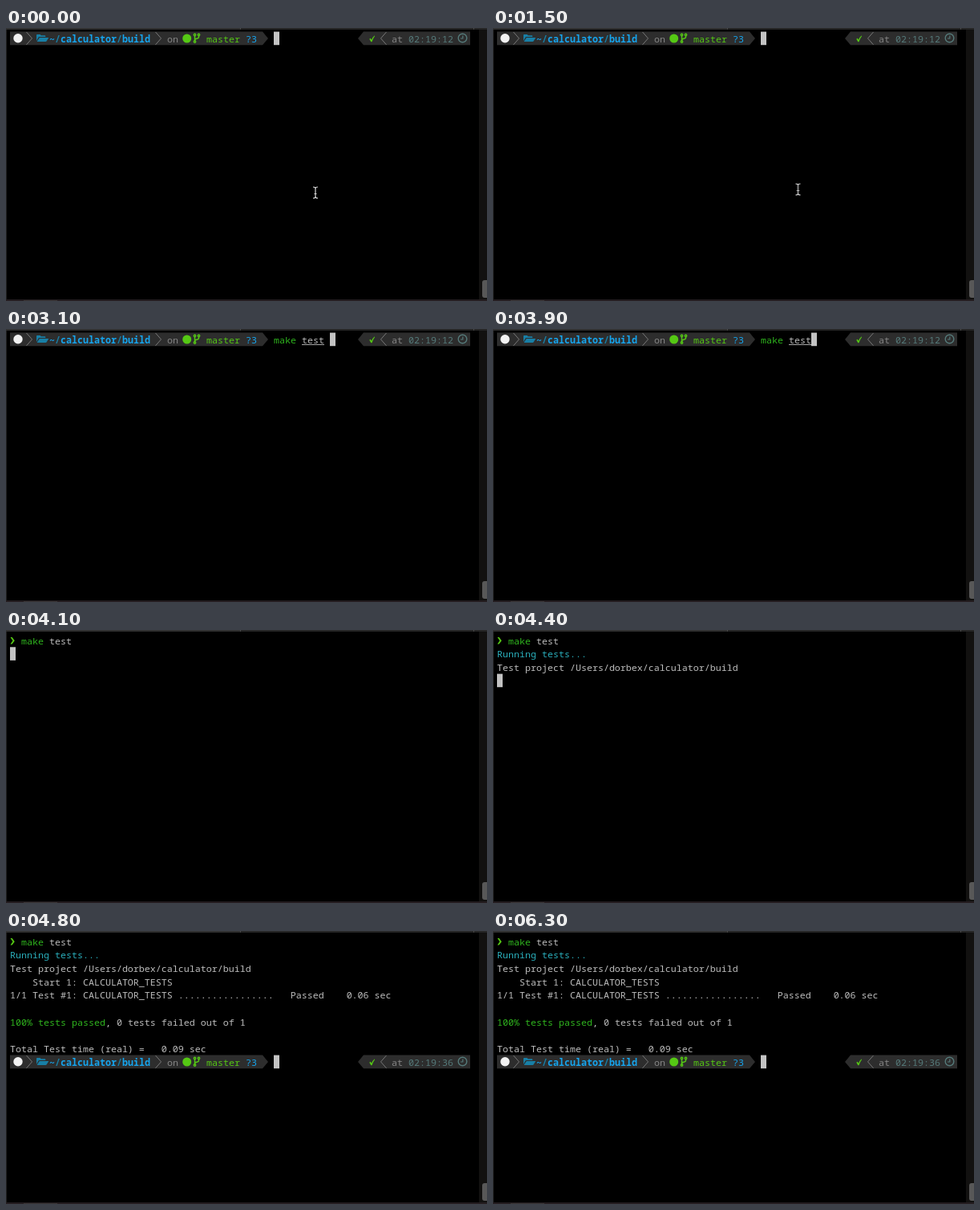
These frames come from a looping animation (600 px wide and 340 px high, 6500 ms). An HTML page:

```html
<!DOCTYPE html>
<html lang="en">
<head>
<meta charset="utf-8">
<title>Terminal: make test</title>
<style>
  html, body { margin: 0; width: 100%; height: 100%; overflow: hidden; background: #000; }
  svg { display: block; width: 600px; height: 340px; }
  text, tspan { white-space: pre; }
  text { font: 11.667px "Noto Sans Mono", "DejaVu Sans Mono", monospace; fill: #bdbdbd; }
  .bold { font-weight: 700; }
  .green { fill: #2fb51e; }
  .lime { fill: #55c814; }
  .cyan { fill: #2aafbc; }
  .sky { fill: #16a5ee; }
  .blue { fill: #187fa6; }
  .gray { fill: #858585; }
  .teal { fill: #557a7a; }
  .dim { fill: #585858; }
  .line { fill: none; stroke: #777; stroke-width: 1; }
  .block { fill: #c3c3c3; }

  #pointer { animation: nudge 6.5s step-end infinite; }
  @keyframes nudge {
    0% { transform: translate(386px, 205px); }
    1.538% { transform: translate(380.5px, 201px); }
  }
</style>
</head>
<body>
<svg viewBox="0 0 600 340">
  <defs>
    <g id="bar">
      <path d="M5 4.6H320L327 12.9L320 21.2H5Z" fill="#2d2d2d"/>
      <path d="M446 4.6H579V21.2H446L439 12.9Z" fill="#2d2d2d"/>
      <circle cx="15" cy="12.7" r="5.7" fill="#f2f2f2"/>
      <path class="line" d="M25.5 5L32.5 12.9L25.5 20.8M186.500 5L193.500 12.9L186.500 20.8M474.500 5L467.500 12.9L474.500 20.800"/>
      <path class="blue" d="M38 16V8.800Q38 8 38.800 8H42.500L43.800 9.300H48.500Q49.300 9.300 49.300 10.200V11H42Q40.800 11 40.200 12ZM38.600 17L41.200 12.700Q41.600 12 42.400 12H53.300L50.700 16.300Q50.300 17 49.500 17Z"/>
      <text x="54" y="17.500" class="bold sky">~<tspan class="blue">/</tspan>calculator<tspan class="blue">/</tspan>build</text>
      <text x="201" y="17.500" class="gray">on</text>
      <circle cx="225.700" cy="13" r="5.500" class="lime"/>
      <g fill="none" stroke="#55c814" stroke-width="1.400">
        <path d="M235.500 9.500V16.500M240.500 10V11Q240.500 13 238 13.200Q235.500 13.500 235.500 15"/>
        <circle cx="235.500" cy="8.500" r="1.200"/>
        <circle cx="240.500" cy="8.500" r="1.200"/>
        <circle cx="235.500" cy="17" r="1.200"/>
      </g>
      <text x="250" y="17.500" class="lime">master <tspan class="sky">?3</tspan></text>
      <path class="lime" d="M453.300 13.800L454.700 12.800L456 14.700Q457.500 11.200 459.600 9.600L460.200 10Q457.800 13 456.400 17.200H455.300Z"/>
      <text x="481" y="17.500" class="gray">at</text>
      <circle cx="569.500" cy="12.500" r="5.300" fill="none" stroke="#557a7a" stroke-width="1.400"/>
      <path d="M569.800 9.500V13H567" fill="none" stroke="#557a7a" stroke-width="1.200"/>
    </g>
  </defs>

  <rect width="600" height="340"/>
  <rect width="292" height="2" fill="#303030"/>
  <rect x="293" width="307" height="2" fill="#262626"/>
  <path d="M292.500 0V2M583.500 0V2" stroke="#484848"/>
  <rect y="2" width="1" height="336" fill="#202020"/>
  <rect x="590" y="2" width="10" height="336" fill="#121110"/>
  <rect x="594" y="314" width="8" height="22" rx="3" fill="#585858"/>
  <rect y="338" width="600" height="2" fill="#241d20"/>
  <rect x="22" y="339" width="42" height="1" fill="#383536"/>

  <g data-to="4100">
    <use href="#bar"/>
    <text x="502" y="17.500" class="teal">02:19:12</text>
    <text x="334" y="17.500"><tspan id="command" class="green"></tspan><tspan id="argument"></tspan><tspan id="hint" class="dim"></tspan></text>
    <path data-from="2800" d="M369 19.500H397" stroke="#a8a8a8"/>
  </g>

  <g data-from="4100">
    <path d="M5.500 9H7.600L10.800 13.200L7.600 17.400H5.500L8.400 13.200Z" class="lime"/>
    <text x="19" y="17.500"><tspan class="green">make</tspan> test</text>
  </g>
  <text data-from="4200" data-row="1" class="cyan">Running tests...</text>
  <text data-from="4400" data-row="2">Test project /Users/dorbex/calculator/build</text>
  <text data-from="4500" data-row="3">    Start 1: CALCULATOR_TESTS</text>
  <text data-from="4600" data-row="4">1/1 Test #1: CALCULATOR_TESTS .................   Passed    0.06 sec</text>
  <text data-from="4600" data-row="6"><tspan class="green">100% tests passed</tspan>, 0 tests failed out of 1</text>
  <text data-from="4600" data-row="8">Total Test time (real) =   0.09 sec</text>
  <g data-from="4700" transform="translate(0 150)">
    <use href="#bar"/>
    <text x="502" y="17.500" class="teal">02:19:36</text>
  </g>

  <rect id="cursor" class="block" width="7" height="16.600"/>
  <g data-to="1600">
    <path id="pointer" d="M-3 -7Q0 -7 0 -5Q0 -7 3 -7M0 -5V5M-3 7Q0 7 0 5Q0 7 3 7M-1.500 1.500H1.500" fill="none" stroke="#d8d8d8" stroke-width="1.200"/>
  </g>
</svg>
<script>
  const LOOP = 6500, CELL = 7, ROW = 16.667;
  const LINE = "make test";
  const $ = id => document.getElementById(id);

  // [time, typed characters]; completion adds a trailing space
  const typing = [[0, 0], [1600, 1], [1800, 2], [1900, 3], [2100, 4],
                  [2400, 5], [2500, 6], [2600, 7], [2800, 10], [3900, 9]];
  // [time, column, row] of the cursor once the command runs
  const output = [[4100, 0, 1], [4200, 0, 2], [4400, 0, 3], [4500, 0, 4],
                  [4600, 0, 9], [4700, 47, 9]];

  const timed = [...document.querySelectorAll("[data-from], [data-to]")];
  for (const line of document.querySelectorAll("[data-row]")) {
    line.setAttribute("x", 5);
    line.setAttribute("y", 17.5 + line.dataset.row * ROW);
  }

  const latest = (steps, time) => steps.filter(step => step[0] <= time).pop();

  function draw(time) {
    for (const el of timed) {
      const { from = 0, to = LOOP } = el.dataset;
      el.style.display = time >= +from && time < +to ? "" : "none";
    }
    const count = latest(typing, time)[1];
    $("command").textContent = LINE.slice(0, Math.min(count, 4));
    $("argument").textContent = LINE.slice(4, Math.max(count, 4));
    $("hint").textContent = count ? LINE.slice(count) : "";
    if (count < 4) $("argument").textContent = "";

    const [, column, row] = latest(output, time) || [0, 47 + count, 0];
    $("cursor").setAttribute("x", 5 + column * CELL);
    $("cursor").setAttribute("y", 4.6 + row * ROW);
  }

  const pointerMotion = $("pointer").getAnimations()[0];
  const start = performance.now();
  function tick() {
    const time = (performance.now() - start) % LOOP;
    if (pointerMotion) pointerMotion.currentTime = time;
    draw(time);
    requestAnimationFrame(tick);
  }
  tick();
</script>
</body>
</html>
```
